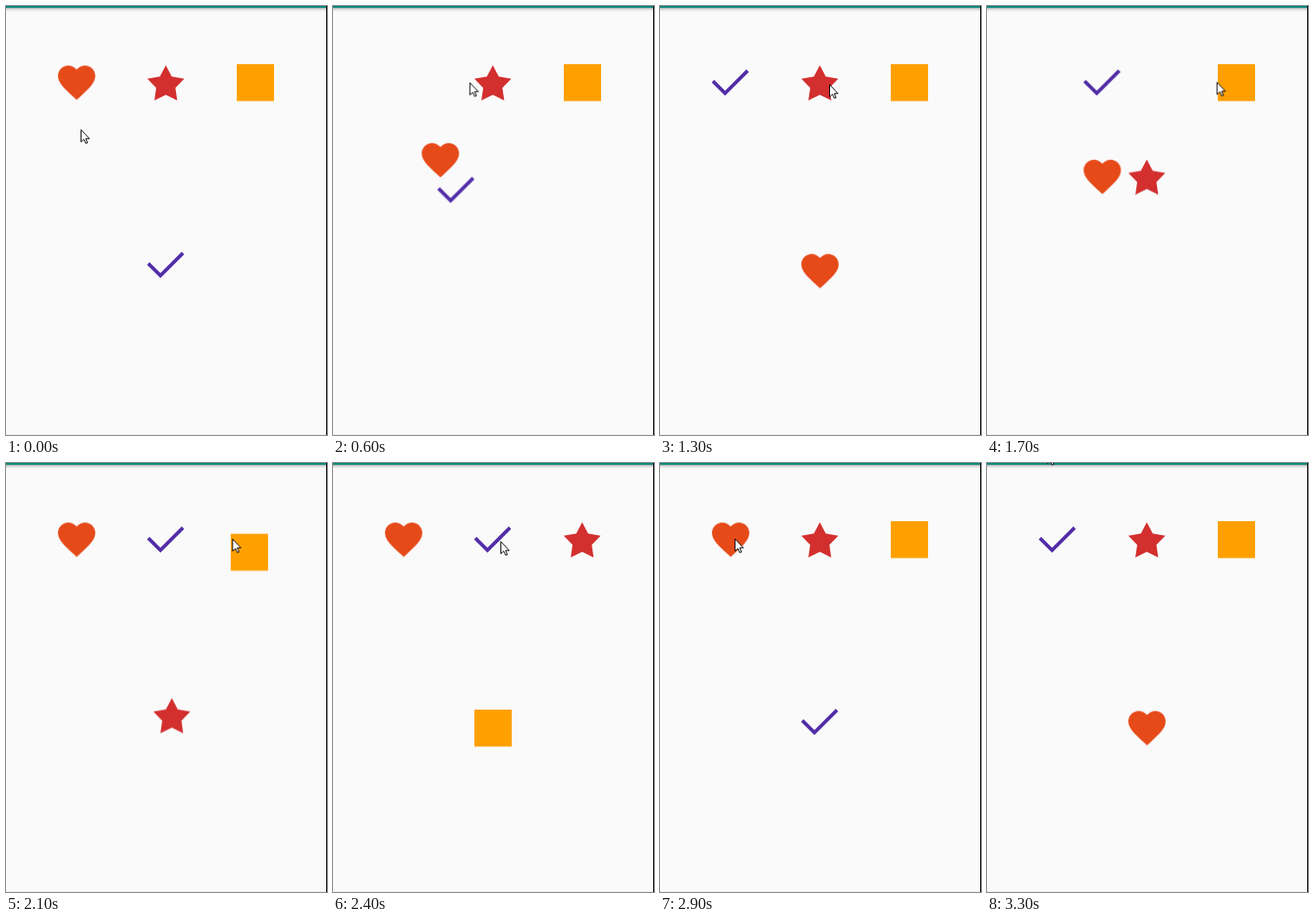
Write an HTML page that moves like this. It is 370 px wide and 494 px high and loops after 3.5 s.

```html
<!DOCTYPE html>
<html lang="en">
<head>
<meta charset="utf-8">
<title>Swapping shapes</title>
<style>
  html, body { margin: 0; width: 100%; height: 100%; overflow: hidden; background: #fafafa; }
  svg { display: block; width: 370px; height: 494px; }
</style>
</head>
<body>
<svg viewBox="0 0 370 494">
  <defs>
    <linearGradient id="shade" x2="0" y2="1">
      <stop offset="0" stop-color="#000" stop-opacity=".34"/>
      <stop offset=".4" stop-color="#000" stop-opacity=".1"/>
      <stop offset="1" stop-color="#000" stop-opacity="0"/>
    </linearGradient>
  </defs>
  <rect width="370" height="494" fill="#fafafa"/>
  <rect y="2" width="369" height="5" fill="url(#shade)"/>
  <rect width="369" height="2" fill="#00897b"/>
  <rect y="493" width="369" height="1" fill="#ededed"/>
  <rect x="369" width="1" height="494" fill="#000"/>

  <g id="square"><rect x="-21" y="-21" width="43" height="42.5" fill="#ffa000"/></g>
  <g id="star"><polygon fill="#d32f2f"/></g>
  <g id="heart">
    <path transform="translate(.4 .3) scale(2.15) translate(-12 -12.175)" fill="#e64a19"
      d="M12 21.35l-1.45-1.32C5.4 15.36 2 12.28 2 8.5 2 5.42 4.42 3 7.5 3c1.74 0 3.41.81 4.5 2.09C13.09 3.81 14.76 3 16.5 3 19.58 3 22 5.42 22 8.5c0 3.78-3.4 6.86-8.55 11.54z"/>
  </g>
  <g id="check"><path d="M-20-1.5L-6 12.5 20-13.5" fill="none" stroke="#512da8" stroke-width="4"/></g>
  <g id="cursor">
    <path d="M.5.5V14.5L3.8 11.5 6 16.3 8 15.4 5.9 10.8H10.2Z" fill="#fff" stroke="#000"/>
  </g>
</svg>
<script>
  const LOOP = 3500, TICK = 100, SWAP = 300;

  const shapes = ['heart', 'check', 'star', 'square'];
  const clicks = [
    [467, 'heart'], [1550, 'star'], [2050, 'square'], [2590, 'check'], [3000, 'heart']
  ];

  // Pointer hops: start time, end time, where the tip lands.
  const pointerStart = [86, 142];
  const hops = [
    [0, 300, 77, 102], [455, 850, 211, 88], [1000, 1300, 195, 90],
    [1480, 1900, 285, 90], [2050, 2400, 193, 90], [2550, 2900, 86, 87],
    [2990, 3300, 69, -14]
  ];

  const mix = (a, b, p) => a.map((v, i) => v + (b[i] - v) * p);
  const progress = (t, start, end) => Math.min(1, Math.max(0, (t - start) / (end - start)));
  const easeInOut = p => (1 - Math.cos(Math.PI * p)) / 2;
  const easeOut = p => 1 - (1 - p) ** 2;

  // The selected shape sits below; the others fill the row in their fixed order.
  function slotOf(name, selected) {
    if (name === selected) return [184, name === 'check' ? 298 : 305];
    const column = shapes.filter(s => s !== selected).indexOf(name);
    return [81 + 103 * column, 88];
  }

  function shapeAt(name, t) {
    return clicks.reduce(
      (pos, [start, selected]) =>
        mix(pos, slotOf(name, selected), easeInOut(progress(t, start, start + SWAP))),
      slotOf(name, 'check'));
  }

  // Each hop slows down towards its end and bows slightly upwards.
  function pointerAt(t) {
    return hops.reduce((from, [start, end, ...to]) => {
      const p = easeOut(progress(t, start, end));
      const [x, y] = mix(from, to, p);
      const bow = 0.045 * Math.hypot(to[0] - from[0], to[1] - from[1]);
      return p < 1 ? [x, y - bow * Math.sin(Math.PI * p)] : to;
    }, pointerStart);
  }

  function starPoints(radius, innerRatio, cx, cy) {
    return Array.from({ length: 10 }, (_, i) => {
      const r = i % 2 ? radius * innerRatio : radius, a = i * Math.PI / 5;
      return [cx + r * Math.sin(a), cy - r * Math.cos(a)];
    }).join(' ');
  }

  function play(id, positionAt) {
    const frames = [];
    for (let t = 0; t <= LOOP; t += TICK) {
      const [x, y] = positionAt(t);
      frames.push({
        offset: t / LOOP,
        transform: `translate(${x.toFixed(2)}px, ${y.toFixed(2)}px)`,
        easing: 'step-end'
      });
    }
    document.getElementById(id).animate(frames, { duration: LOOP, iterations: Infinity });
  }

  document.querySelector('#star polygon').setAttribute('points', starPoints(22.4, 0.52, 0.2, 2.6));
  for (const name of shapes) play(name, t => shapeAt(name, t));
  play('cursor', pointerAt);
</script>
</body>
</html>
```
